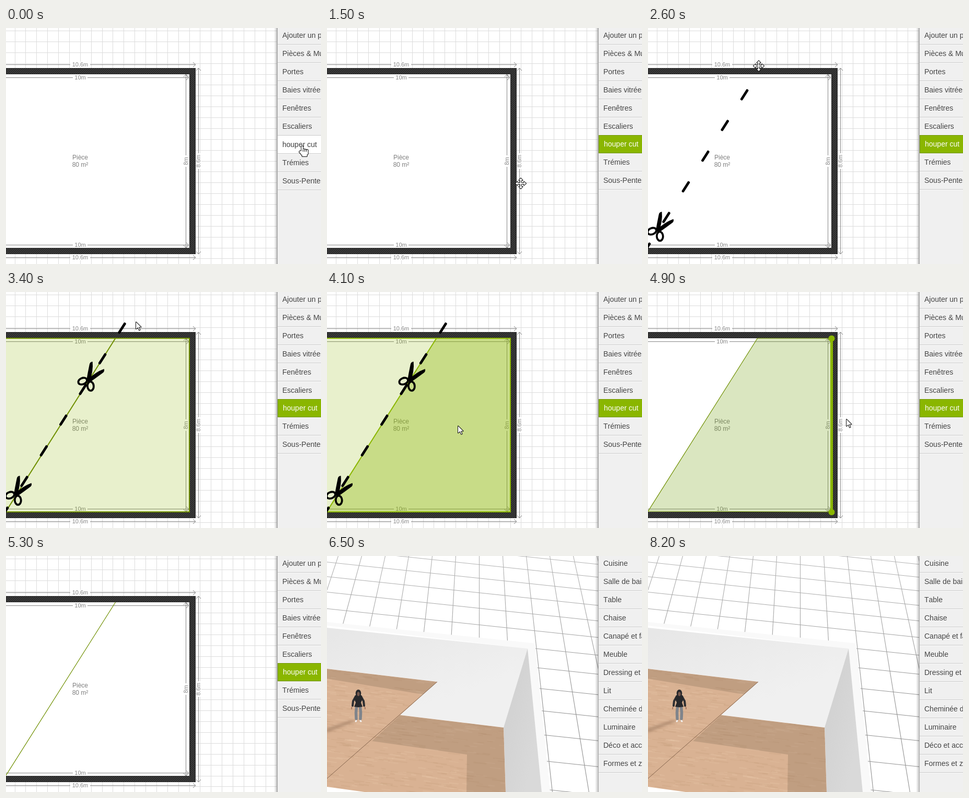
These frames come from a looping animation (603 by 454 pixels, 9700 ms). An HTML page with a canvas:

```html
<!DOCTYPE html>
<html lang="fr">
<head>
<meta charset="utf-8">
<title>Plan 2D / 3D</title>
<style>
html, body { margin: 0; width: 100%; height: 100%; overflow: hidden; background: #fff; }
canvas { display: block; }
</style>
</head>
<body>
<canvas id="stage" width="603" height="454"></canvas>
<script>
const W = 603, H = 454, LOOP = 9700, TICK = 100;
const ctx = document.getElementById('stage').getContext('2d');
const FONT = '"Liberation Sans", Arial, sans-serif';
const GREEN = '#8ab600', OLIVE = '#6f8f00', DIM = '#858585', WALL = '#2b2b2b';
const PANEL_X = 519, ROW = 35, CUT_TOOL = 6;
const TOOLS = ['Ajouter un plan', 'Pièces & Murs', 'Portes', 'Baies vitrées', 'Fenêtres',
  'Escaliers', 'houper cut', 'Trémies', 'Sous-Pentes'];
const FURNITURE = ['Cuisine', 'Salle de bain', 'Table', 'Chaise', 'Canapé et fauteuil', 'Meuble',
  'Dressing et rangement', 'Lit', 'Cheminée déco', 'Luminaire', 'Déco et accessoires', 'Formes et zones'];

// moments of the story, in ms
const PICK = 1100, DRAG = 2300, CUT = 3400, SPLIT = 4400, LEAVE = 5300, SHOP = 6200, VIEW_3D = 6500;

const span = (t, from, to) => Math.min(1, Math.max(0, (t - from) / (to - from)));
const mix = (a, b, k) => a.map((v, i) => v + (b[i] - v) * k);

function trace(points, close) {
  ctx.beginPath();
  points.forEach(([x, y], i) => i ? ctx.lineTo(x, y) : ctx.moveTo(x, y));
  if (close) ctx.closePath();
}
function poly(color, ...points) {
  trace(points, true);
  ctx.fillStyle = color;
  ctx.fill();
}
function line(color, width, ...points) {
  trace(points);
  ctx.strokeStyle = color;
  ctx.lineWidth = width;
  ctx.stroke();
}
function rect(color, x, y, w, h) {
  ctx.fillStyle = color;
  ctx.fillRect(x, y, w, h);
}
function oval(color, x, y, rx, ry) {
  ctx.beginPath();
  ctx.ellipse(x, y, rx, ry, 0, 0, 7);
  ctx.fillStyle = color;
  ctx.fill();
}
function text(str, x, y, size, color, align = 'left') {
  ctx.font = size + 'px ' + FONT;
  ctx.fontKerning = 'none';
  ctx.textAlign = align;
  ctx.fillStyle = color;
  ctx.fillText(str, x, y);
}
function ramp(a, b, from, to) {
  const g = ctx.createLinearGradient(...a, ...b);
  g.addColorStop(0, from);
  g.addColorStop(1, to);
  return g;
}
function at(x, y, draw, angle = 0) {
  ctx.save();
  ctx.translate(x, y);
  ctx.rotate(angle);
  draw();
  ctx.restore();
}
function mirrored(draw) {
  draw();
  ctx.scale(-1, 1);
  draw();
  ctx.scale(-1, 1);
}
function random(seed) {
  return () => (seed = (seed * 16807) % 2147483647) / 2147483647;
}

/* ---- plan view ---- */

const TOP = 89, RIGHT = 351, BOTTOM = 423, LEFT = -20, THICK = 12;
const CELL = (BOTTOM - TOP) / 16;
const MID_X = 142, MID_Y = 256;
const SPLIT_TOP = [209.5, TOP], SPLIT_END = [0, BOTTOM - 1];
const ROOM = [[LEFT, TOP], [RIGHT, TOP], [RIGHT, BOTTOM], [LEFT, BOTTOM]];
const PART = [SPLIT_TOP, [RIGHT, TOP], [RIGHT, BOTTOM], SPLIT_END];

function drawGrid() {
  for (let x = RIGHT % CELL - .5; x < PANEL_X; x += CELL) rect('#dcdcdc', Math.round(x), 0, 1, H);
  for (let y = TOP % CELL - .5; y < H; y += CELL) rect('#dcdcdc', 0, Math.round(y), PANEL_X, 1);
}

function drawWalls() {
  const frame = (grow) => [LEFT, TOP - grow, RIGHT - LEFT + grow, BOTTOM - TOP + 2 * grow];
  ctx.save();
  ctx.beginPath();
  ctx.rect(...frame(THICK));
  ctx.clip();
  rect(WALL, 0, 0, W, H);
  for (let x = -H; x < W; x += 4) line('#535353', .8, [x, H], [x + H, 0]);
  ctx.restore();
  ctx.strokeStyle = WALL;
  ctx.lineWidth = 1;
  for (const grow of [.5, THICK - .5]) ctx.strokeRect(...frame(grow));
  rect('#fff', ...frame(0));
}

// a dimension runs along the local x axis, its label at the origin
function drawDim(label, from, to, gap, both) {
  rect('#fff', -gap, -5, 2 * gap, 11);
  line(DIM, 1, [from, .5], [-gap, .5]);
  line(DIM, 1, [gap, .5], [to, .5]);
  for (const [x, dir] of both ? [[from, 1], [to, -1]] : [[to, -1]]) {
    line(DIM, 1, [x + 5 * dir, -4], [x, .5], [x + 5 * dir, 5]);
  }
  text(label, 0, 4, 11, DIM, 'center');
}
function drawDims() {
  const rowDim = (label, y, end, gap) => at(MID_X, y, () => drawDim(label, -MID_X, end - MID_X, gap));
  const colDim = (label, x, half, gap) =>
    at(x, MID_Y, () => drawDim(label, -half, half, gap, true), -Math.PI / 2);
  const half = (BOTTOM - TOP) / 2;
  rowDim('10.6m', TOP - 19, RIGHT + THICK, 19);
  rowDim('10m', TOP + 6, RIGHT - 1, 14);
  rowDim('10m', BOTTOM - 6, RIGHT - 1, 14);
  rowDim('10.6m', BOTTOM + 18, RIGHT + THICK, 19);
  colDim('8m', RIGHT - 7, half, 11);
  colDim('8.6m', RIGHT + 17, half + THICK, 15);
  text('Pièce', MID_X, MID_Y - 3, 12, '#808080', 'center');
  text('80 m²', MID_X, MID_Y + 11, 12, '#808080', 'center');
}

// points along the cutting line, one unit per dash
const DASH = [-37.4, 59], CUT_ANGLE = Math.atan2(-DASH[0], DASH[1]);
const cutPoint = (i) => [222 + DASH[0] * i, 69.5 + DASH[1] * i];
const BLADE = new Path2D('M-3 4Q2-18 13-32Q17-29 15-24Q9-8 3 6Z');

function drawScissors() {
  mirrored(() => {
    ctx.fillStyle = '#000';
    ctx.fill(BLADE);
    ctx.beginPath();
    ctx.ellipse(9, 9.8, 8.7, 6, .95, 0, 7);
    ctx.strokeStyle = '#000';
    ctx.lineWidth = 3.8;
    ctx.stroke();
  });
}
function drawCut(topY, pair) {
  ctx.lineCap = 'round';
  for (let i = 0; i < 7; i++) {
    if (cutPoint(i)[1] > topY) line('#000', 5, cutPoint(i - .14), cutPoint(i + .14));
  }
  ctx.lineCap = 'butt';
  for (const i of pair ? [5.39, 1.67] : [5.39]) {
    if (cutPoint(i)[1] > topY) at(...cutPoint(i), drawScissors, CUT_ANGLE);
  }
}

function drawHalves(hover) {
  const edge = hover ? GREEN : OLIVE;
  poly('rgba(138,182,0,.2)', ...ROOM);
  if (hover) poly('rgba(138,182,0,.34)', ...PART);
  line(edge, 2, ...ROOM);
  line(edge, 2, SPLIT_TOP, SPLIT_END);
  drawCut(0, true);
}
function drawSplit(t) {
  if (t < 5000) {
    poly('rgba(107,155,7,.25)', ...PART);
    line(OLIVE, 1, ...PART);
  }
  line(OLIVE, 1.2, SPLIT_TOP, SPLIT_END);
  if (t >= 4800 && t < 5000) {
    line(GREEN, 5, [RIGHT + .5, TOP], [RIGHT + .5, BOTTOM]);
    for (const y of [TOP, BOTTOM]) oval(GREEN, RIGHT + .5, y + .5, 6, 6);
  }
}
function drawPlan(t) {
  rect('#fff', 0, 0, W, H);
  drawGrid();
  drawWalls();
  drawDims();
  const y = pointerAt(t)[1];
  if (t >= SPLIT) drawSplit(t);
  else if (t >= CUT) drawHalves(y > TOP);
  else if (t > DRAG) drawCut(t < 2700 ? y : 0, t > 2700);
}

/* ---- 3D view ---- */

const BACK_TOP = [384, 178], OUTER_TOP = [398, 168], SIDE_END = [411, H];
const CORNER = [338, 330], CORNER_END = [342, H], NOTCH = [140, 306], TIP = [211, 242];
const BACK_LEFT = [0, 217], SEAM_END = [0, 428];

function drawGround() {
  rect('#fff', 0, 0, W, H);
  const ink = ramp([0, 0], [0, 300], '#b4b4b4', '#909090');
  const gap = (y) => 45 + .055 * y;
  for (let i = -7; i < 6; i++) line(ink, 1.1, [291.5 + i * gap(0), 0], [291.5 + i * gap(H), H]);
  const horizon = gap(0) / .055;
  for (let i = -10; i < 6; i++) {
    const y = 1 / (9.31e-4 - i * 3.545e-5) - horizon;
    line(ink, 1, [0, y - 44.5], [520, y + 11]);
  }
}

function drawFloor() {
  ctx.save();
  trace([BACK_LEFT, TIP, NOTCH, CORNER, CORNER_END, [72, H], [0, 444]], true);
  ctx.clip();
  rect('#d9b293', 0, 200, 350, 254);
  const rnd = random(41);
  for (let i = 0; i < 620; i++) {
    const x = rnd() * 370 - 20, y = 205 + rnd() * 250, len = 8 + rnd() * 22;
    const tone = rnd() < .55 ? 'rgba(170,125,90,.1)' : 'rgba(255,230,206,.1)';
    line(tone, 1 + rnd() * 2, [x, y], [x + len, y + len * .12]);
  }
  const shade = 'rgba(112,92,72,.24)';
  poly(shade, BACK_LEFT, TIP, mix(TIP, SEAM_END, .13), [0, 236]);
  poly(shade, NOTCH, CORNER, CORNER_END, [267, H], [268, 382], [86, 356]);
  ctx.filter = 'blur(2px)';
  poly('rgba(105,75,55,.3)', [57, 317], [45, 316], [0, 331], [0, 340]);
  ctx.filter = 'none';
  ctx.restore();
  line('rgba(105,75,55,.75)', 1, TIP, SEAM_END);
}

function drawPerson() {
  ctx.lineCap = 'round';
  mirrored(() => {
    line('#2d2e31', 4, [5, 13], [10, 22], [11, 31]);
    line('#a87963', 2, [12.5, 34], [13, 37]);
    line('#7f848b', 5.5, [3.5, 33], [4.5, 44], [4, 56]);
    line('#f5f5f5', 3, [4, 60], [5, 61]);
  });
  ctx.lineCap = 'butt';
  mirrored(() => poly('#27282b', [0, 9], [6, 11], [8, 18], [5, 25], [8, 33], [0, 34]));
  oval('#27282b', 0, 7, 5.3, 7);
  oval('#75594e', 0, 8.5, 2.5, 4);
}

function drawScene() {
  drawGround();
  poly('#f9f9f9', [0, 127], OUTER_TOP, [427, H], [0, H]);
  poly('#fff', [0, 134], BACK_TOP, SIDE_END, [0, H]);
  poly(ramp([0, 150], [60, 330], '#e7e7e7', '#f0f0f0'), [0, 138], BACK_TOP, CORNER, NOTCH, TIP, BACK_LEFT);
  poly(ramp(CORNER, [405, 345], '#d2d2d2', '#d9d9d9'), BACK_TOP, SIDE_END, CORNER_END, CORNER);
  drawFloor();
  at(60, 257, drawPerson);
}

/* ---- side panel ---- */

function drawPanel(items, hover, active) {
  rect(ramp([513, 0], [PANEL_X, 0], 'rgba(0,0,0,0)', 'rgba(0,0,0,.22)'), 513, 0, 6, H);
  rect('#f0f0f0', PANEL_X, 0, W - PANEL_X, H);
  rect('#a9a9a9', PANEL_X, 0, 1, H);
  const x = PANEL_X + 1, w = W - x;
  items.forEach((label, i) => {
    const y = ROW * i - 3 - (active >= 0 && i >= active ? 1 : 0);
    if (i === active) {
      rect('#6f9400', x, y, w, ROW);
      rect(GREEN, x + 1, y + 1, w, ROW - 2);
      text(label, x + 10, y + 22, 14, '#fff');
      return;
    }
    if (i === hover) rect('#fff', x, y, w, ROW - 1);
    rect('#cacaca', x, y + ROW - 1, w, 1);
    rect('#fbfbfb', x, y + ROW, w, 1);
    text(label, x + 9, y + 23, 14, '#fff');
    text(label, x + 9, y + 22, 14, '#404040');
  });
}

/* ---- pointer ---- */

const MENU = [565, 226], START = [-16, 446], EDGE = [212, 73], ABOVE = [248, 56], INSIDE = [250, 256], EXIT = [622, 218];

function pointerAt(t) {
  if (t < DRAG) return mix(MENU, START, span(t, 1300, 1900));
  if (t < 2600) return mix(START, EDGE, span(t, DRAG, 2600));
  if (t < CUT) return mix(EDGE, ABOVE, span(t, 2600, CUT));
  if (t < SPLIT) return mix(ABOVE, INSIDE, span(t, CUT, 3800));
  return mix(INSIDE, EXIT, span(t, 4500, LEAVE) ** 1.53);
}

function outlined(path) {
  ctx.lineJoin = 'round';
  ctx.strokeStyle = '#111';
  ctx.lineWidth = 2;
  ctx.stroke(path);
  ctx.fillStyle = '#fff';
  ctx.fill(path);
}
function drawArrow() {
  outlined(new Path2D('M1 2V15L4.500 12 7 17.500 8.500 17 6 11.500H10.500Z'));
}
function drawMove() {
  const path = new Path2D(), arm = new Path2D('M-1 0V-6H-3.500L0-10 3.500-6H1V0Z');
  for (let i = 0; i < 4; i++) path.addPath(arm, new DOMMatrix().rotate(90 * i));
  outlined(path);
}
function drawHand() {
  const path = new Path2D();
  path.roundRect(.5, 1, 3, 14, 1.5);
  for (let i = 1; i < 4; i++) path.roundRect(.5 + 3.2 * i, 6 + .7 * i, 3, 9, 1.5);
  path.roundRect(-3.5, 10.5, 5, 4, 2);
  path.roundRect(-1, 11, 14, 7, 3);
  path.roundRect(2, 16, 9, 5, 0);
  outlined(path);
  for (let x = 3.7; x < 11; x += 3.2) line('#111', 1, [x, 8], [x, 12]);
}
function drawPointer(t) {
  const [x, y] = pointerAt(t).map(Math.round);
  at(x, y, t < 1400 ? drawHand : t < CUT ? drawMove : drawArrow);
}

function draw(now) {
  const t = Math.floor((now % LOOP) / TICK) * TICK;
  ctx.lineJoin = 'miter';
  if (t < VIEW_3D) drawPlan(t);
  else drawScene();
  if (t < SHOP) drawPanel(TOOLS, CUT_TOOL, t < PICK ? -1 : CUT_TOOL);
  else drawPanel(FURNITURE, -1, -1);
  if (t < LEAVE) drawPointer(t);
}

let start = null;
function tick(now) {
  if (start === null) start = now;
  draw(now - start);
  requestAnimationFrame(tick);
}
draw(0);
requestAnimationFrame(tick);
</script>
</body>
</html>
```
